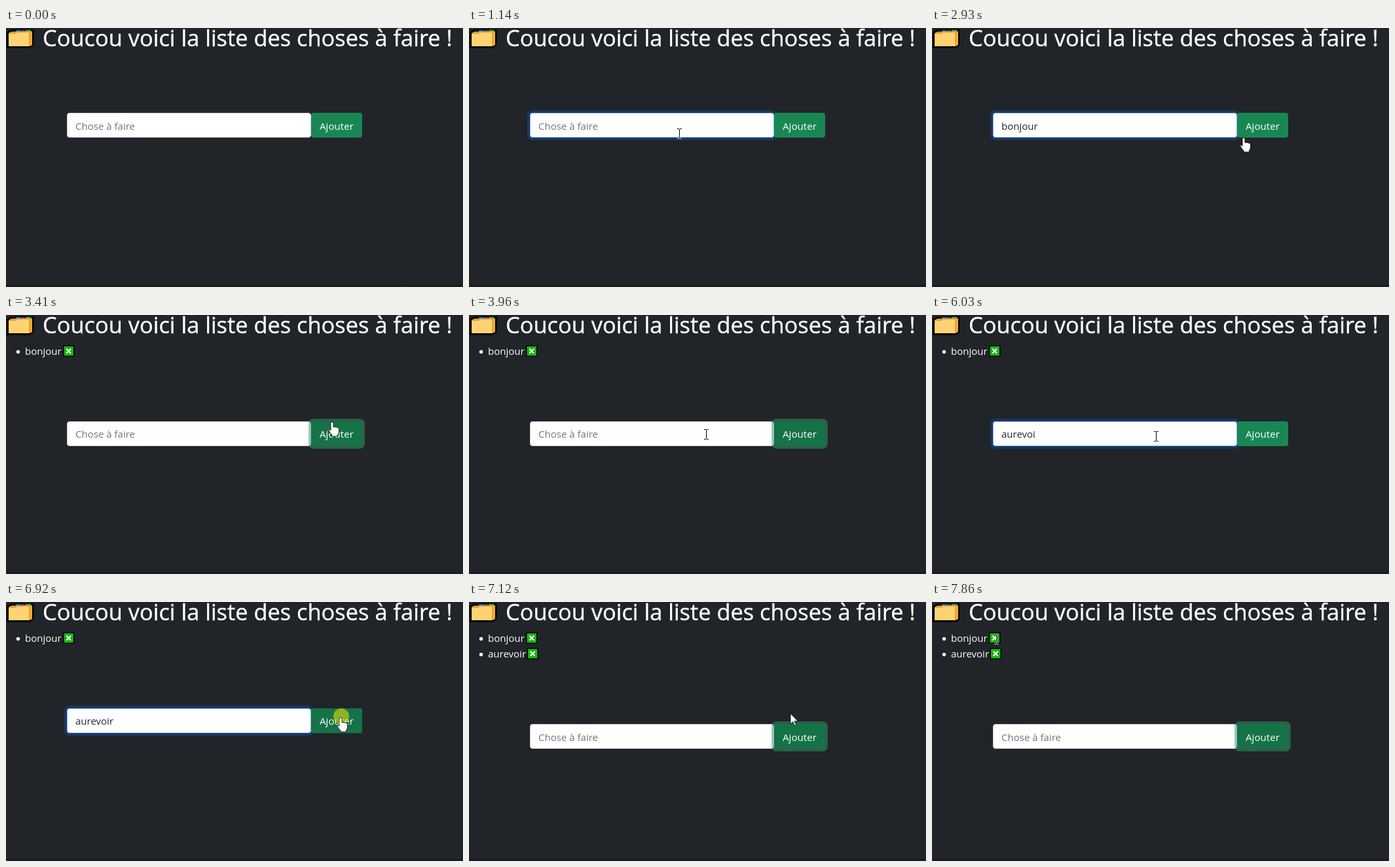
Write an HTML page that moves like this. It is 698 by 397 pixels and loops after 7.99 s.

```html
<!DOCTYPE html>
<html lang="fr">
<head>
<meta charset="utf-8">
<title>Liste des choses à faire</title>
<style>
  html, body { margin: 0; width: 100%; height: 100%; overflow: hidden; background: #212529; }
  svg { display: block; width: 698px; height: 397px; }
  text { font: 15.02px "Open Sans", "Noto Sans", sans-serif; fill: #fff; white-space: pre; }
  #title { font-size: 34.4px; stroke: #fff; stroke-width: .4px; }
  #menu text { font-size: 11.1px; fill: #fbfbfe; }
  #hint { fill: #6c757d; }
  #typed { fill: #212529; }
  #add { font-size: 15.15px; }
  #ibeam { mix-blend-mode: difference; }
</style>
</head>
<body>
<svg viewBox="0 0 698 397">
  <defs>
    <g id="cross">
      <rect width="17.5" height="17.5" rx="1.5" fill="#000"/>
      <rect x="1.5" y="1.5" width="14.5" height="14.5" rx=".5" fill="#16b512"/>
      <path d="M5.2 5.2l7 7m0-7l-7 7" stroke="#fff" stroke-width="2"/>
    </g>
  </defs>
  <rect width="698" height="397" fill="#212529"/>
  <rect y="393" width="698" height="4" fill="#1c1e22"/>

  <g id="folder" stroke-linejoin="round">
    <path d="M2.500 7L8 4H14L17 3.500H41L40.500 26L36 29.500H2.500Z" fill="#e8a033" stroke="#000" stroke-width="3"/>
    <path d="M15 4.500h8" stroke="#2f8fe0" stroke-width="2"/>
    <path d="M24 4.500h5" stroke="#d8433b" stroke-width="2"/>
    <path d="M30 4h8" stroke="#2fa866" stroke-width="2"/>
    <path d="M36 8L40 5V26L36 28Z" fill="#f2a92c"/>
    <path d="M4 9H14L17 7H35V28H4Z" fill="#ffd373"/>
  </g>
  <text id="title" x="56" y="28">Coucou voici la liste des choses à faire !</text>

  <g id="item1">
    <circle cx="18.500" cy="56.500" r="2.700" fill="#fff"/>
    <text x="29" y="61">bonjour</text>
    <use href="#cross" x="87" y="46.500"/>
  </g>
  <g id="item2">
    <circle cx="18.500" cy="80.500" r="2.700" fill="#fff"/>
    <text x="29" y="85">aurevoir</text>
    <use href="#cross" x="88.500" y="70.500"/>
  </g>

  <g id="form">
    <rect id="inputRing" x="89" y="-4" width="381" height="46" rx="8" fill="#1c375e"/>
    <rect x="93.500" y=".5" width="372" height="37" rx="3.500" fill="#fff" stroke="#ced4da"/>
    <rect id="inputEdge" x="93.500" y=".5" width="372" height="37" rx="3.500" fill="none" stroke="#86b7fe"/>
    <rect id="btnRing" x="462" y="-4" width="86" height="46" rx="8" fill="#3c996e"/>
    <rect x="466" width="78" height="38" rx="4" fill="#198754"/>
    <rect id="btnDark" x="466" width="78" height="38" rx="4" fill="#157347"/>
    <rect id="caret" y="9" width="1" height="21" fill="#000"/>
    <g id="labels">
      <text id="hint" x="106">Chose à faire</text>
      <text id="typed" x="106"></text>
      <text id="add" x="479">Ajouter</text>
    </g>
  </g>

  <g id="menu">
    <rect x="93.500" y="200.500" width="372" height="101" fill="#2b2a33" stroke="#9a9aa5"/>
  </g>

  <circle id="click" r="12" fill="#ffeb00" fill-opacity=".52"/>
  <path id="ibeam" d="M-3-7H0V-6H1V-7H4V-6H1V8H4V9H1V8H0V9H-3V8H0V-6H-3Z" fill="#fff"/>
  <path id="hand" d="M-2 2Q-2 0 0 0T2 2V8Q3 6.500 4.700 8Q6 6.800 7.500 8.600Q9.500 8 10.500 10V15Q10 18 8.500 20V22H0V20Q-3 17-5.500 12.500Q-4.500 10.500-2 13Z" fill="#fff" stroke="#000" stroke-width=".8"/>
  <path id="arrow" d="M0 0V16L3.700 12.600L6.200 18.500L8.600 17.500L6.100 11.800H11.300Z" fill="#fff" stroke="#000" stroke-width=".8"/>
</svg>
<script>
const LOOP = 7990, ADD1 = 3270, ADD2 = 7060;
const $ = id => document.getElementById(id);
const show = (id, on) => $(id).setAttribute('visibility', on ? 'visible' : 'hidden');
const fade = (id, v) => $(id).setAttribute('opacity', v);
const move = (id, x, y) => $(id).setAttribute('transform', `translate(${x} ${y})`);
const clamp = v => Math.min(1, Math.max(0, v));

// [start time, text in the field]
const typing = [
  [0, ''], [1280, 'b'], [1470, 'bo'], [1610, 'bon'], [1680, 'bonj'], [1800, 'bonjo'],
  [1940, 'bonjou'], [2670, 'bonjour'], [ADD1, ''], [4440, 'a'], [4770, 'au'],
  [4970, 'aur'], [5100, 'aure'], [5300, 'aurev'], [5440, 'aurevo'], [5570, 'aurevoi'],
  [6220, 'aurevoir'], [ADD2, '']
];
// [time, x, y] of the pointer's hot spot
const path = [
  [0, 604, 395], [70, 600, 390], [400, 430, 262], [670, 321, 161], [2670, 321, 161],
  [2930, 476, 168], [3070, 498, 158], [3250, 498, 160], [3410, 498, 164], [3480, 498, 164],
  [4030, 342, 185], [6220, 342, 185], [6450, 430, 156], [6600, 490, 153], [6780, 511, 177],
  [7100, 511, 177], [7530, 102, 64], [7700, 102, 64], [7860, 98, 56], [LOOP, 98, 56]
];
const clicks = [[680, 800], [3120, 3250], [4030, 4150], [6915, 7040]];
const caretOn = [[740, 1140], [1280, 2200], [2670, 2900], [4100, 6030], [6220, 6740]];
const inputFocus = [[700, 3150], [4040, 6960]];
const btnFocus = [[3150, 4040], [6960, LOOP]];
const btnDark = [[2930, 4040], [6600, LOOP]];

const within = (spans, t) => spans.some(([a, b]) => t >= a && t < b);
const ease = (spans, t) => Math.max(...spans.map(([a, b]) =>
  Math.min(clamp((t - a) / 150), 1 - clamp((t - b) / 150))));

function pointer(t) {
  const i = path.findIndex(k => k[0] > t);
  const [a, ax, ay] = path[i - 1], [b, bx, by] = path[i];
  const p = (t - a) / (b - a);
  return [ax + (bx - ax) * p, ay + (by - ay) * p];
}

function pointerShape(x, y, top) {
  if (y >= top && y <= top + 38) {
    if (x >= 466 && x <= 544) return 'hand';
    if (x >= 93 && x < 466) return 'ibeam';
  }
  return x < 110 && y < 90 ? 'ibeam' : 'arrow';
}

['a faire', 'aie', 'ajouter', 'az', 'aze'].forEach((word, i) => {
  const row = document.createElementNS('http://www.w3.org/2000/svg', 'text');
  row.setAttribute('x', 99);
  row.setAttribute('y', 216 + 20 * i);
  row.textContent = word;
  $('menu').append(row);
});

function draw(t) {
  const count = (t >= ADD1) + (t >= ADD2);
  const top = [130, 163, 187][count];
  show('item1', count > 0);
  show('item2', count > 1);
  move('form', 0, top);
  move('labels', 0, [26, 25, 26][count]);

  const text = typing.filter(k => k[0] <= t).pop()[1];
  if ($('typed').textContent !== text) $('typed').textContent = text;
  show('hint', !text);
  show('caret', within(caretOn, t));
  $('caret').setAttribute('x', 106 + Math.round(text ? $('typed').getComputedTextLength() : 0));

  const focus = ease(inputFocus, t);
  fade('inputRing', focus);
  fade('inputEdge', focus);
  fade('btnRing', ease(btnFocus, t) * 0.5);
  fade('btnDark', ease(btnDark, t));
  fade('menu', t < 4840 ? clamp((t - 4500) / 70) : 0);

  const [x, y] = pointer(t).map(Math.round);
  const shape = pointerShape(x, y, top);
  for (const id of ['ibeam', 'hand', 'arrow']) {
    show(id, id === shape);
    move(id, x, y);
  }
  show('click', within(clicks, t));
  move('click', x + 1, y - 2);
}

const start = performance.now();
function tick() {
  draw((performance.now() - start) % LOOP);
  requestAnimationFrame(tick);
}
tick();
</script>
</body>
</html>
```
